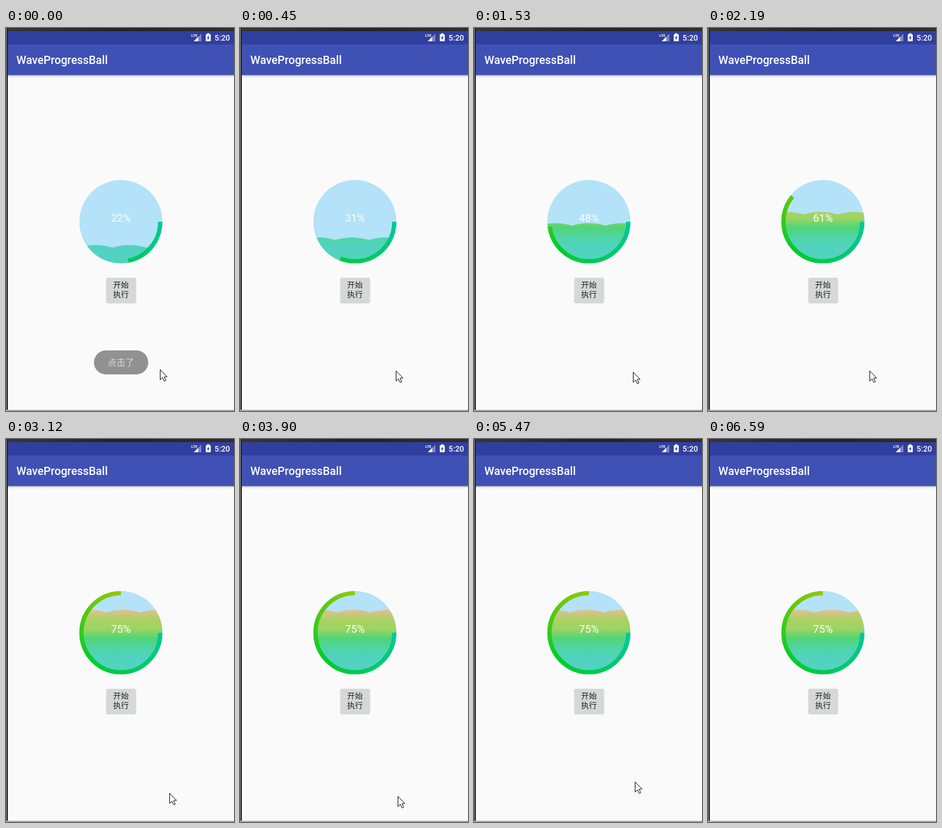
These frames come from a looping animation (363x607 px, 6690 ms). An HTML page with a canvas:

```html
<!DOCTYPE html>
<html lang="zh-CN">
<head>
<meta charset="utf-8">
<title>WaveProgressBall</title>
<style>
  html, body { margin: 0; width: 100%; height: 100%; overflow: hidden; background: #fafafa; }
  canvas { display: block; }
</style>
</head>
<body>
<canvas id="stage" width="363" height="607"></canvas>
<script>
const ctx = document.getElementById('stage').getContext('2d');
const W = 363, H = 607, LOOP = 6690, TICK = LOOP / 55;
const LATIN = 'Roboto, sans-serif';
const CJK = '"Noto Sans CJK SC", "Noto Sans CJK", sans-serif';
const ball = { x: 182.9, y: 307, r: 66.1, ring: 6.8 };
const wave = { length: 53.5, height: 4, period: 820 };

// Key positions of the mouse pointer.
const POINTER = [
  { t: 0, x: 245, y: 541 }, { t: 990, x: 251, y: 546 }, { t: 2190, x: 257, y: 543 },
  { t: 2700, x: 267, y: 556 }, { t: 3120, x: 261, y: 561 }, { t: 3900, x: 251, y: 566 },
  { t: 5470, x: 256, y: 543 }, { t: 6330, x: 329, y: 583 }
];

const mix = (a, b, k) => a + (b - a) * k;

function rect(x, y, w, h, color) {
  ctx.fillStyle = color;
  ctx.fillRect(x, y, w, h);
}

function roundRect(x, y, w, h, r, color) {
  ctx.fillStyle = color;
  ctx.beginPath();
  ctx.roundRect(x, y, w, h, r);
  ctx.fill();
}

function polygon(points, color) {
  ctx.beginPath();
  points.forEach(([x, y]) => ctx.lineTo(x, y));
  ctx.closePath();
  ctx.fillStyle = color;
  ctx.fill();
}

function text(str, x, y, font, color, align = 'center') {
  ctx.font = font;
  ctx.fillStyle = color;
  ctx.textAlign = align;
  ctx.fillText(str, x, y);
}

// Spreads the colours evenly over the first part of a gradient.
function spread(gradient, colors, part = 1) {
  colors.forEach((color, i) => gradient.addColorStop(part * i / (colors.length - 1), color));
  return gradient;
}

const waterFill = spread(ctx.createLinearGradient(0, 272, 0, 345),
  ['#dec08f', '#a9d262', '#9dd463', '#50d576', '#50d4a2', '#51d3bf']);
const ringStroke = spread(ctx.createConicGradient(0, ball.x, ball.y),
  ['#00c89b', '#00cc28', '#96c800'], 0.75);
const appShadow = spread(ctx.createLinearGradient(0, 74, 0, 79),
  ['rgba(0,0,0,.28)', 'rgba(0,0,0,.09)', 'rgba(0,0,0,0)']);
const topEdge = spread(ctx.createLinearGradient(0, 0, W, 0), ['#383638', '#242225', '#302d30']);

function drawStatusIcons() {
  text('LTE', 295, 14, 'bold 6px ' + LATIN, '#fff', 'left');
  polygon([[299, 21], [311, 21], [311, 9]], '#7d87c4');
  polygon([[299, 21], [306, 21], [306, 14]], '#fff');
  roundRect(318, 10, 8, 11, 1, '#fff');
  rect(320, 8.5, 4, 2, '#fff');
  polygon([[322.8, 11.5], [319.8, 16.3], [321.6, 16.3], [321.2, 19.5], [324.2, 14.8], [322.4, 14.8]], '#303f9f');
  text('5:20', 356.5, 20, '500 12.4px ' + LATIN, '#fff', 'right');
}

function drawScreen() {
  rect(0, 0, W, H, '#fafafa');
  rect(0, 5, W, 21, '#303f9f');
  rect(0, 26, W, 48.5, '#3f51b5');
  rect(0, 74, W, 5, appShadow);
  rect(0, 0, W, 5, topEdge);
  rect(0, 0, 1, H, '#8c8c8c');
  rect(1, 0, 2, H, '#252427');
  rect(0, 605, W, 2, '#adadad');
  text('WaveProgressBall', 16.5, 57, '500 17.9px ' + LATIN, '#fff', 'left');
  drawStatusIcons();
}

function drawButton() {
  ctx.save();
  ctx.shadowColor = 'rgba(0,0,0,.25)';
  ctx.shadowBlur = 2;
  ctx.shadowOffsetY = 0.7;
  roundRect(160, 396, 46.5, 39, 2, '#d6d7d7');
  ctx.restore();
  text('开始', 183, 412.3, '12.5px ' + CJK, '#212121');
  text('执行', 183, 426.7, '12.5px ' + CJK, '#212121');
}

// Upward scallops that slide one wavelength per cycle, easing in and out.
function drawWater(t, level) {
  const { length, height, period } = wave;
  const cycle = (t / period + 0.395) % 1;
  const shift = (1 - Math.cos(Math.PI * cycle)) / 2 * length;
  const base = level + height;
  let x = 151.8 - 2 * length + shift;
  ctx.beginPath();
  ctx.moveTo(x, base);
  for (; x < 255; x += length) {
    ctx.quadraticCurveTo(x + length / 2, base - 2 * height, x + length, base);
  }
  ctx.lineTo(x, 380);
  ctx.lineTo(40, 380);
  ctx.closePath();
  ctx.fillStyle = waterFill;
  ctx.fill();
}

function drawBall(t) {
  const { x, y, r, ring } = ball;
  const percent = Math.floor(Math.min(75, 22.9 + t * 0.0176));
  const level = 373.3 - percent * 4 / 3 - 2.5 * (percent / 75) ** 8;

  ctx.save();
  ctx.beginPath();
  ctx.arc(x, y, r, 0, Math.PI * 2);
  ctx.fillStyle = '#b3e2f9';
  ctx.fill();
  ctx.clip();
  drawWater(t, level);
  ctx.restore();

  ctx.beginPath();
  ctx.arc(x, y, r - ring / 2, 0, Math.PI * 2 * percent / 100);
  ctx.strokeStyle = ringStroke;
  ctx.lineWidth = ring;
  ctx.stroke();

  text(percent + '%', 183, 307, '17px ' + LATIN, '#fff');
}

function drawToast(t) {
  ctx.save();
  ctx.globalAlpha = Math.max(0, 0.65 * (1 - t / 400));
  roundRect(140, 511, 86.5, 38, 19, '#5a5a5a');
  text('点击了', 183, 535, '14px ' + CJK, '#fff');
  ctx.restore();
}

function drawPointer(t) {
  const next = POINTER.findIndex(key => key.t > t);
  if (next < 0) return;
  const from = POINTER[next - 1], to = POINTER[next];
  const k = (t - from.t) / (to.t - from.t);
  ctx.save();
  ctx.translate(Math.round(mix(from.x, to.x, k)) + 0.5, Math.round(mix(from.y, to.y, k)) + 0.5);
  polygon([[0, 0], [0, 16], [3.7, 12.5], [6.5, 18.3], [9, 17.2], [6.3, 11.5], [11, 11.3]], '#fff');
  ctx.strokeStyle = '#111';
  ctx.lineWidth = 1;
  ctx.stroke();
  ctx.restore();
}

function frame() {
  const now = performance.now() % LOOP;
  const t = Math.min(54, Math.floor(now / TICK + 0.37)) * TICK;
  drawScreen();
  drawBall(t);
  drawButton();
  drawToast(t);
  drawPointer(t);
  requestAnimationFrame(frame);
}
frame();
</script>
</body>
</html>
```
